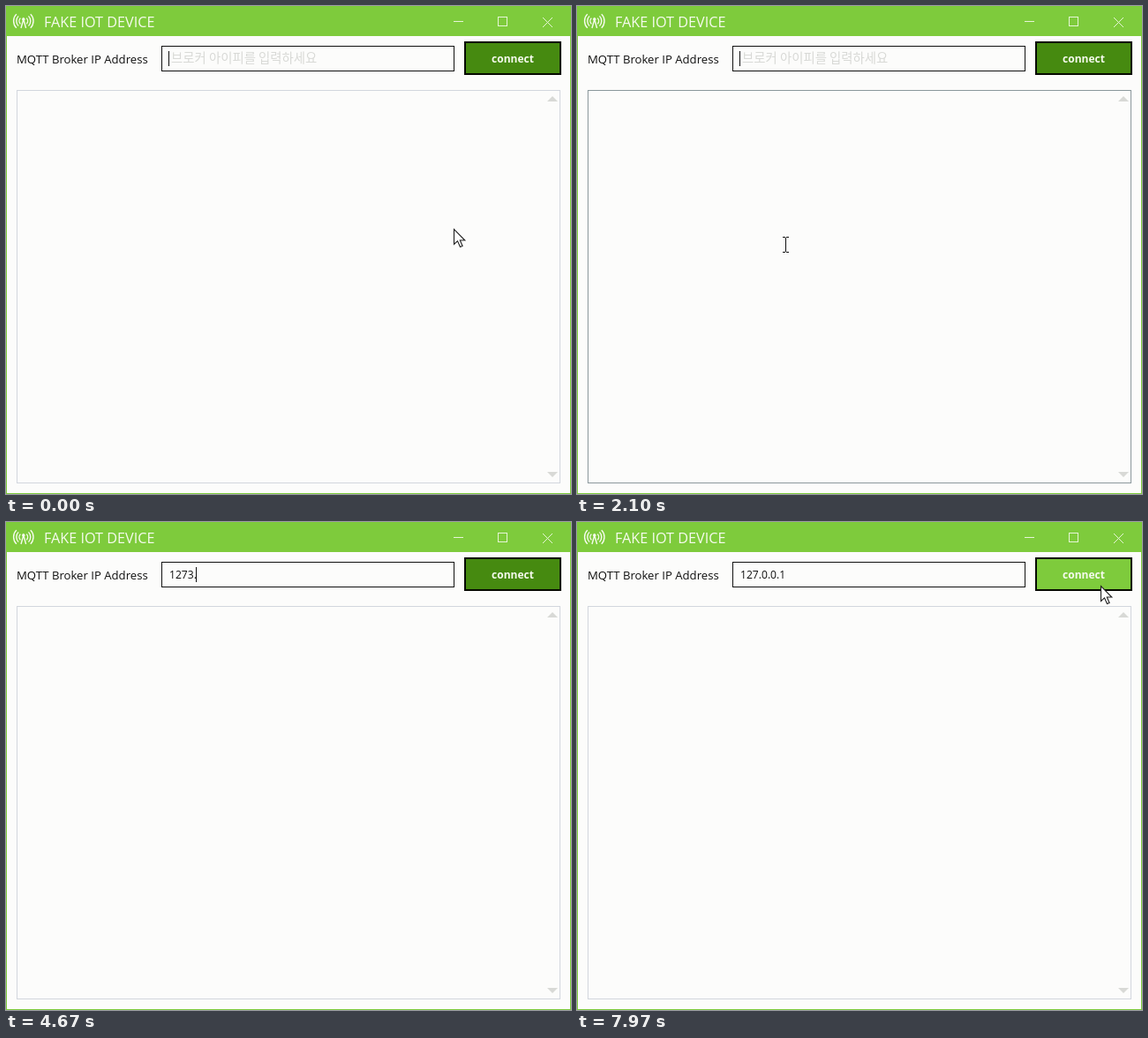
Write an HTML page with a canvas that moves like this. It is 640 px wide and 552 px high and loops after 8000 ms.

```html
<!DOCTYPE html>
<html lang="ko">
<head>
<meta charset="utf-8">
<title>Fake IoT Device</title>
<style>
html, body { margin: 0; width: 100%; height: 100%; overflow: hidden; background: #fcfcfb; }
canvas { display: block; }
</style>
</head>
<body>
<canvas id="stage" width="640" height="552"></canvas>
<script>
const ctx = document.getElementById('stage').getContext('2d');
const LOOP = 8000, BLINK = 530, TYPE_START = 3540, MOUSE_BACK = 6920;
const GREEN = '#7ecb3c', DARK_GREEN = '#468a10', PAPER = '#fcfcfb', INK = '#101010';
const PALE = '#d8d9d6', WHITE = '#f6fbee';
const LATIN = '"Open Sans", "Noto Sans", sans-serif';
const KOREAN = '"Noto Sans CJK KR", "Noto Sans CJK", sans-serif';

// time, x, y of the pointer hotspot
const path = [
  [0, 507, 252], [830, 512, 247], [1300, 515, 244], [1640, 506, 247],
  [2100, 236, 270], [2500, 254, 150], [2740, 266, 64], [3340, 263, 62],
  [6920, 262, 63], [7310, 238, 75], [7500, 290, 80], [7710, 508, 78], [7970, 593, 72], [8000, 594, 72]
];

const keys = [
  [3540, '1'], [3840, '12'], [3940, '127'], [4060, '1273'], [4170, '1273.'],
  [5010, '1273'], [5170, '127'], [5410, '127.'], [5670, '127.0'],
  [5870, '127.0.'], [6050, '127.0.0'], [6210, '127.0.0.'], [6380, '127.0.0.1']
];

function slope(i, axis) {
  if (i === 0 || i === path.length - 1) return 0;
  const [a, b, c] = [path[i - 1], path[i], path[i + 1]];
  const before = (b[axis] - a[axis]) / (b[0] - a[0]);
  const after = (c[axis] - b[axis]) / (c[0] - b[0]);
  return before * after > 0 ? 2 * before * after / (before + after) : 0;
}

// Monotone cubic interpolation along the path
function pointer(t) {
  let i = 0;
  while (i < path.length - 2 && path[i + 1][0] <= t) i++;
  const a = path[i], b = path[i + 1], span = b[0] - a[0], u = (t - a[0]) / span;
  return [1, 2].map(k =>
    a[k] + (b[k] - a[k]) * u * u * (3 - 2 * u) +
    span * u * (1 - u) * (slope(i, k) * (1 - u) - slope(i + 1, k) * u));
}

function text(str, x, y, font, color, align = 'left') {
  ctx.font = font;
  ctx.fillStyle = color;
  ctx.textAlign = align;
  ctx.fillText(str, x, y);
}

function box(x, y, w, h, color, width = 1) {
  ctx.strokeStyle = color;
  ctx.lineWidth = width;
  ctx.strokeRect(x, y, w, h);
}

function line(points, color, width = 1) {
  ctx.beginPath();
  points.forEach(([x, y]) => ctx.lineTo(x, y));
  ctx.strokeStyle = color;
  ctx.lineWidth = width;
  ctx.stroke();
}

function fillShape(points, color) {
  ctx.beginPath();
  points.forEach(([x, y]) => ctx.lineTo(x, y));
  ctx.closePath();
  ctx.fillStyle = color;
  ctx.fill();
}

function antenna() {
  ctx.strokeStyle = WHITE;
  ctx.lineWidth = 1.4;
  for (const r of [4.8, 8, 11.2]) {
    for (const side of [0, Math.PI]) {
      ctx.beginPath();
      ctx.arc(19.8, 17, r, side - 0.78, side + 0.78);
      ctx.stroke();
    }
  }
  line([[17, 25], [19.8, 15], [22.6, 25]], WHITE, 1.4);
  ctx.beginPath();
  ctx.arc(19.8, 15, 1.8, 0, 7);
  ctx.fillStyle = WHITE;
  ctx.fill();
}

function titleBar() {
  ctx.fillStyle = GREEN;
  ctx.fillRect(0, 0, 640, 34);
  antenna();
  text('FAKE IOT DEVICE', 43, 24, '16.2px ' + LATIN, WHITE);
  const c = '#e6f5d6';
  line([[507, 17.5], [518, 17.5]], c);
  box(557.5, 12.5, 10, 10, c);
  line([[608, 13], [619, 24]], c);
  line([[619, 13], [608, 24]], c);
}

function arrow(x, y) {
  ctx.save();
  ctx.translate(Math.round(x) + 0.5, Math.round(y) + 0.5);
  fillShape([[0, 0], [0, 17], [4, 13.3], [7, 20], [9.6, 19], [6.8, 12.5], [12.3, 12.5]], '#fff');
  ctx.strokeStyle = '#202020';
  ctx.lineWidth = 1.1;
  ctx.stroke();
  ctx.restore();
}

function beam(x, y) {
  x = Math.round(x) + 0.5;
  y = Math.round(y);
  line([[x, y - 8], [x, y + 8]], INK);
  for (const end of [y - 8.5, y + 8.5]) {
    line([[x - 3.5, end], [x - 0.5, end]], INK);
    line([[x + 0.5, end], [x + 3.5, end]], INK);
  }
}

function draw(t) {
  const [mx, my] = pointer(t);
  const mouse = t < TYPE_START || t >= MOUSE_BACK;
  const overLog = t >= 1700 && t < TYPE_START && my > 95;
  const overButton = t >= MOUSE_BACK && mx >= 519;
  const overInput = my < 73 && mx < 508;
  const key = keys.filter(k => k[0] <= t).pop();
  const [since, typed] = key || [-485, ''];

  ctx.fillStyle = PAPER;
  ctx.fillRect(0, 0, 640, 552);
  box(0.5, 0.5, 639, 551, GREEN);
  titleBar();

  text('MQTT Broker IP Address', 12, 65, '13.15px ' + LATIN, INK);

  box(176.5, 45.5, 331, 28, INK);
  if (!typed) text('브로커 아이피를 입력하세요', 187, 64, '14.4px ' + KOREAN, PALE);
  text(typed, 185, 64, '12.1px ' + LATIN, INK);
  if (Math.floor((t - since) / BLINK) % 2 === 0) {
    const x = Math.round(184 + ctx.measureText(typed).width) + 0.5;
    line([[x, 51], [x, 68]], INK);
  }

  ctx.fillStyle = overButton ? GREEN : DARK_GREEN;
  ctx.fillRect(519, 40, 110, 38);
  box(520, 41, 108, 36, '#060a00', 2);
  text('connect', 574, 64, 'bold 12px ' + LATIN, WHITE, 'center');

  box(12.5, 95.5, 615, 444, overLog ? '#8b989c' : '#d2d6dd');
  fillShape([[613, 108], [619, 102], [625, 108]], PALE);
  fillShape([[613, 527], [619, 533], [625, 527]], PALE);

  if (mouse) (overLog || overInput ? beam : arrow)(mx, my);
}

const start = performance.now();
function tick() {
  draw((performance.now() - start) % LOOP);
  requestAnimationFrame(tick);
}
tick();
</script>
</body>
</html>
```
